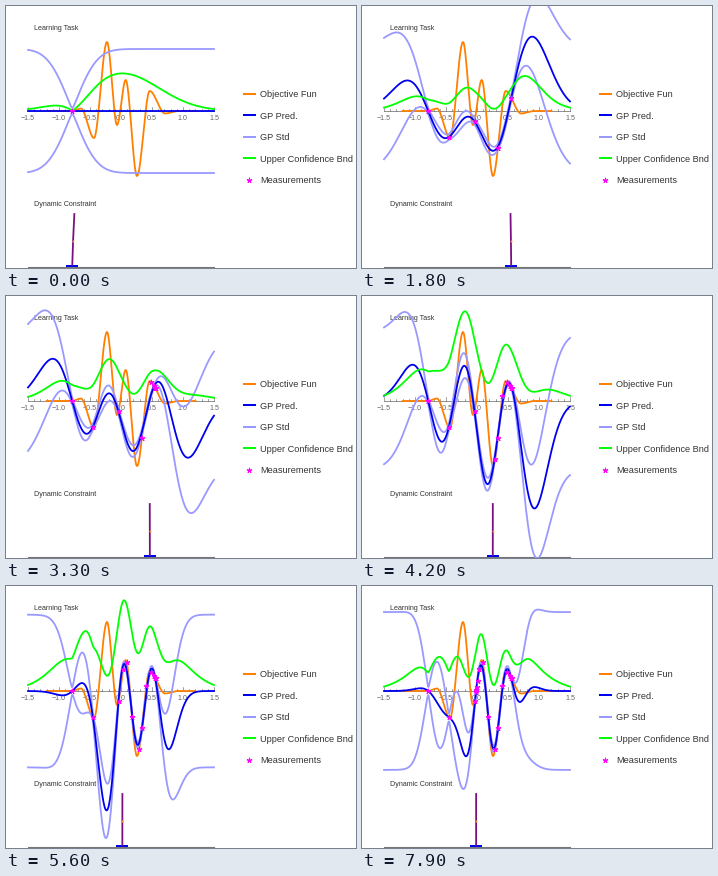
Animation of 350 by 262 pixels, one loop 8000 ms. Source, as a matplotlib script:

```python
import numpy as np
import matplotlib.pyplot as plt
from matplotlib.animation import FuncAnimation
from matplotlib.patches import Rectangle

W, H, DPI = 350, 262, 100
FRAMES, STEP = 80, 100
PX = 72 / DPI
X0, Y0, UNIT = 115, 105, 62          # plot origin and pixels per x unit
LEFT, RIGHT, GROUND = 22, 208, 261
NOISE = 0.05                         # relative to the kernel scale

ORANGE, BLUE, PALE = "#ff8000", "#0000f0", "#9999ff"
GREEN, MAGENTA, GRAY = "#00ff00", "#ff00ff", "#666666"

plt.rcParams["font.family"] = "Liberation Sans"


def logistic(x):
    return 1 / (1 + np.exp(-x))


# Turning points of the objective
PEAK_X = np.array([66, 75, 88, 101, 111, 119.7, 131, 143.7, 159, 172])
PEAK_Y = np.array([0, 2.5, -27, 69, -14, 31, -65, 20, -2.5, 0])


def objective(x):
    """Smooth steps from one turning point to the next."""
    x = np.clip(x, PEAK_X[0], PEAK_X[-1])
    i = np.clip(np.searchsorted(PEAK_X, x) - 1, 0, len(PEAK_X) - 2)
    s = (x - PEAK_X[i]) / (PEAK_X[i + 1] - PEAK_X[i])
    return PEAK_Y[i] + (PEAK_Y[i + 1] - PEAK_Y[i]) * s * s * (3 - 2 * s)


def cart_x(t):
    """Fast sweep to the right, then a slow return towards the middle."""
    u = np.clip(t / 1.95, 0, 1)
    sweep = 1 - (1 - u) ** 2 * (1 + 1.2 * u)
    return 66.3 + 84.5 * sweep - 36.7 * logistic((t - 4.1) / 0.55)


TIMES = np.arange(0, FRAMES * STEP / 1000, 0.45)
SAMPLES = cart_x(TIMES)
GRID = np.linspace(LEFT, RIGHT, 373)
WEIGHT = 0.61 * np.exp(-((GRID - X0) / 38) ** 2 / 2)


def regress(xs, length, scale):
    """Gaussian process mean and deviation on GRID."""
    def kernel(a, b):
        return np.exp(-((a[:, None] - b) / length) ** 2 / 2)

    gram = kernel(xs, xs) + np.eye(len(xs)) * NOISE ** 2
    cross = kernel(xs, GRID)
    solved = np.linalg.solve(gram, cross)
    var = 1 - (cross * solved).sum(axis=0)
    return objective(xs) @ solved, scale * np.sqrt(np.clip(var, 0, None))


fig = plt.figure(figsize=(W / DPI, H / DPI), dpi=DPI, facecolor="white")
ax = fig.add_axes([0, 0, 1, 1])
ax.set_xlim(0, W)
ax.set_ylim(H, 0)
ax.axis("off")


def line(x=(), y=(), color=GRAY, width=1.8, z=3):
    return ax.plot(x, y, color=color, lw=width * PX, zorder=z)[0]


def label(x, y, text, size, color="#333333", **kw):
    ax.text(x, y, text, fontsize=size * PX, color=color,
            va="center_baseline", zorder=2, **kw)


def stars(x=(), y=()):
    return ax.plot(x, y, ls="none", marker=(5, 2, 0), ms=5.4 * PX, mec=MAGENTA,
                   mew=1 * PX, zorder=9)[0]


# Axis with ticks
line([LEFT, RIGHT], [Y0, Y0], width=0.7, z=1)
for k in range(-15, 16):
    x = X0 + k * UNIT / 10
    major = k % 5 == 0
    line([x, x], [Y0, Y0 - (3.6 if major else 2.2)], width=0.6, z=1)
    if major:
        label(x, 111.5, f"{k / 10:.1f}".replace("-", "\u2212"), 7.1, GRAY, ha="center")

label(28, 21, "Learning Task", 7.2)
label(28, 198, "Dynamic Constraint", 7.2)

# Legend
rows = [("Objective Fun", ORANGE), ("GP Pred.", BLUE), ("GP Std", PALE),
        ("Upper Confidence Bnd", GREEN), ("Measurements", None)]
for k, (name, color) in enumerate(rows):
    y = 87.5 + 21.6 * k
    label(254, y, name, 9.1)
    if color:
        line([237.5, 249], [y, y], color, 2)
    else:
        stars([243], [y + 0.5])

# Curves
xs = np.linspace(X0 - 1.2 * UNIT, X0 + 1.2 * UNIT, 400)
line(xs, Y0 - objective(xs), ORANGE)
upper, lower = line(color=PALE, z=4), line(color=PALE, z=4)
pred = line(color=BLUE, z=5)
bound = line(color=GREEN, z=6)
marks = stars()

# Cart and pole
line([LEFT, RIGHT], [GROUND, GROUND], "#777777", 1.1, 1)
cart = ax.add_patch(Rectangle((0, 258.6), 12, 2.4, color=BLUE, lw=0, zorder=7))
pole = line(color="#7a1080", width=1.8, z=8)
joint = ax.plot([], [], "o", ms=2 * PX, color="#ffa030", mew=0, zorder=9)[0]


def update(i):
    t = i * STEP / 1000
    xs = SAMPLES[TIMES <= t + 1e-6]
    fit = logistic((t - 4.5) / 0.65)     # the kernel sharpens as data comes in
    mean, std = regress(xs, 23.5 - 12.5 * fit, 62 + 17 * fit)

    pred.set_data(GRID, Y0 - mean)
    upper.set_data(GRID, Y0 - mean - std)
    lower.set_data(GRID, Y0 - mean + std)
    bound.set_data(GRID, Y0 - WEIGHT * (mean + std - mean.min()))
    marks.set_data(xs, Y0 - objective(xs))

    x = cart_x(t)
    push = (cart_x(t + 0.15) - 2 * x + cart_x(t - 0.15)) / 0.15 ** 2
    lean = np.clip(0.008 * push, -4, 4)
    cart.set_x(x - 6)
    pole.set_data([x, x + 0.4 * lean, x + lean], [259, 234, 208])
    joint.set_data([x + 0.4 * lean], [234.5])
    return upper, lower, pred, bound, marks, cart, pole, joint


anim = FuncAnimation(fig, update, frames=FRAMES, interval=STEP, repeat=True,
                     repeat_delay=0, blit=False)
plt.show()
```
